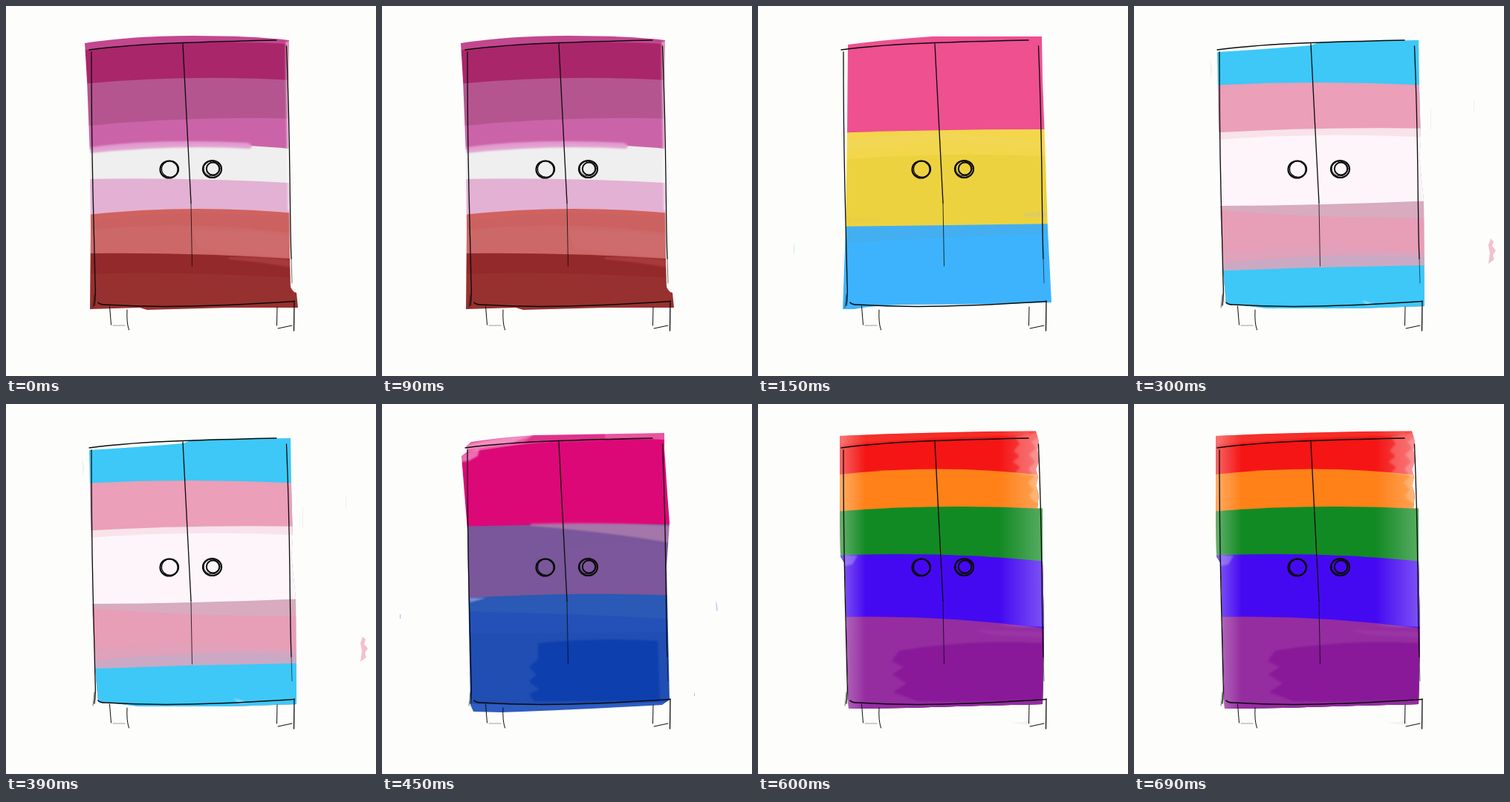
Write an HTML page that moves like this. It is 498 px wide and 498 px high and loops after 0.75 s.

```html
<!DOCTYPE html>
<html lang="en">
<head>
<meta charset="utf-8">
<title>Wardrobe</title>
<style>
  html, body { margin: 0; width: 100%; height: 100%; overflow: hidden; background: #fdfefc; }
  svg { display: block; width: 498px; height: 498px; }
  .look { visibility: hidden; filter: blur(.5px); animation: show 750ms step-end infinite; }
  .soft { filter: blur(1.2px); }
  @keyframes show { 0% { visibility: visible; } 20%, 100% { visibility: hidden; } }
  .ink { fill: none; stroke: #0b0b0b; stroke-linecap: round; stroke-linejoin: round; }
</style>
</head>
<body>
<svg id="stage" viewBox="0 0 498 498">
  <defs>
    <linearGradient id="fadeLeft" gradientUnits="userSpaceOnUse" x1="110" x2="145">
      <stop stop-color="#fff" stop-opacity=".35"/>
      <stop offset="1" stop-color="#fff" stop-opacity="0"/>
    </linearGradient>
    <linearGradient id="fadeRight" gradientUnits="userSpaceOnUse" x1="384" x2="325">
      <stop stop-color="#fff" stop-opacity=".3"/>
      <stop offset="1" stop-color="#fff" stop-opacity="0"/>
    </linearGradient>
  </defs>
  <g id="looks"></g>
  <g class="ink" stroke-width="1.3">
    <path d="M112 59Q165 52 238 49.500T364 46"/>
    <path d="M115 62Q115 160 117 250T120 372Q121 390 119 403"/>
    <path d="M119 388L117 406" stroke-width=".6"/>
    <path d="M377.500 54Q381 140 382 230T384 340"/>
    <path d="M384 340L385 373" stroke-width=".6"/>
    <path d="M238 51Q243.500 160 249 265"/>
    <path d="M249 265L250.500 350" stroke-width=".8"/>
    <path d="M124 399Q126 402 134 402Q190 405.500 250 404T388 397.500" stroke-width="1.500"/>
    <path d="M388 397L387.500 437"/>
    <path d="M139.500 404L141.500 429M163 409Q162 426 165.500 436M365 405L364.500 430M366 434L385 430" stroke-width="1"/>
    <path d="M144 430L160 430" stroke-width=".4"/>
    <g stroke-width="2.200">
      <ellipse cx="219.500" cy="220" rx="12" ry="11.500"/>
      <ellipse cx="221" cy="219.500" rx="11.500" ry="11" stroke-width="1.300"/>
      <ellipse cx="277.500" cy="219.500" rx="12.500" ry="11.500"/>
      <ellipse cx="278.500" cy="219" rx="8.700" ry="8.500" stroke-width="2"/>
      <ellipse cx="277" cy="219" rx="11" ry="10" stroke-width="1"/>
    </g>
  </g>
</svg>
<script>
const NS = 'http://www.w3.org/2000/svg';
const looks = document.getElementById('looks');

function add(parent, tag, attrs) {
  const el = document.createElementNS(NS, tag);
  for (const k in attrs) el.setAttribute(k, attrs[k]);
  return parent.appendChild(el);
}

// Everything below a gently curved edge, given at x = 100, 250 and 400.
function below(left, mid, right) {
  return `M100 ${left}Q250 ${2 * mid - (left + right) / 2} 400 ${right}V420H100Z`;
}

// bands: [colour, left, mid, right]; strokes and specks: [colour, path, opacity]
const themes = [
  {
    body: 'M106 50Q170 40 250 40T381 46L380 110L381 250L382 340L383 378Q386 385 391 386L393 406L300 406L190 409L180 406L113 408L114 300L113 200L109 100Z',
    bands: [
      ['#c2478f', 0, 0, 0], ['#a9266b', 60, 49, 52], ['#b4558f', 105, 97, 101],
      ['#cb63a8', 162, 152, 152], ['#eeefee', 195, 186, 194], ['#e3b1d3', 233, 233, 239],
      ['#d0625f', 282, 273, 280], ['#cb6261', 290, 279, 286], ['#cd6868', 303, 296, 308],
      ['#93292a', 333, 334, 341], ['#97312f', 361, 360, 367]
    ],
    strokes: [
      ['#e39ed0', 'M113 190Q200 178 325 184Q335 188 328 192Q230 186 113 198Z', .95],
      ['#d06f70', 'M250 302Q320 300 381 308V338Q310 336 258 326Z', .5],
      ['#b8464a', 'M300 338Q350 336 383 342V352Q350 345 300 341Z', .6],
      ['#fff', 'M376 50L382 46V275H379Z', .5]
    ],
    specks: []
  },
  {
    body: 'M121 52Q175 45 235 41L382 41L383 100L386 180L390 300L395 399Q300 402 200 402Q155 403 130 408L114 408L118 300L120 170Z',
    bands: [
      ['#ee5090', 0, 0, 0], ['#f4d64c', 171, 167, 166], ['#edd240', 208, 200, 203],
      ['#43aff1', 297, 295, 293], ['#3eb3fd', 320, 312, 306]
    ],
    strokes: [
      ['#d3cb72', 'M357 279L388 277V283L359 284Z', .7],
      ['#f0da65', 'M120 178L250 170L386 184V190L250 182L120 194Z', .4],
      ['#e2cb4a', 'M120 285L168 287L150 291L119 291Z', .5]
    ],
    specks: [['#b9e4fa', 'M49 318Q47 328 49 337Z', .9]]
  },
  {
    body: 'M112 62Q180 58 238 53L252 48L383 46L384 110L386 180L384 205L390 262L391 404L300 407H180L124 400L120 355L116 268L114 170Z',
    bands: [
      ['#3dc8f7', 0, 0, 0], ['#eb9fb9', 107, 103, 107], ['#f8e3ea', 171, 165, 165],
      ['#fdf5f9', 181, 174, 177], ['#d8abbf', 269, 267, 262], ['#e79eb7', 274, 283, 285],
      ['#cba9c4', 347, 336, 335], ['#3dc8f7', 357, 352, 349]
    ],
    strokes: [
      ['#d9a5bf', 'M117 330L255 324L390 330V338L250 334L118 344Z', .5],
      ['#bdeafa', 'M306 396L326 402L314 403Z', .7]
    ],
    specks: [
      ['#f2b9cc', 'M480 313L484 317L482 323L487 329L483 335L485 341L477 347L479 333L477 322Z', .9],
      ['#eeeeee', 'M102 70L106 85L103 100Z', .7],
      ['#e6e6e6', 'M399 138H400V166H399ZM457 125H458V142H457Z', .6]
    ]
  },
  {
    body: 'M107 70L115 64L113 57L120 51Q160 45 205 42L380 39L380 60L384 120L387 160L383 219L384 260L387 398L377 405Q250 412 160 415L123 414L119 405L117 300L115 170Z',
    bands: [
      ['#e9559f', 0, 0, 0], ['#dc0877', 68, 49, 49], ['#79579a', 165, 162, 162],
      ['#2a59b6', 262, 256, 258], ['#2351b7', 279, 283, 290], ['#204eb3', 308, 308, 307],
      ['#2e5cc0', 403, 405, 400]
    ],
    strokes: [
      ['#f29ac9', 'M106 68L131 60L129 70L116 77L107 78Z', .7],
      ['#f5a9cf', 'M112 56Q150 45 204 42L170 54L114 62Z', .7],
      ['#df2a86', 'M204 41L300 39V49L190 53Z', .8],
      ['#c28ab4', 'M200 161Q300 158 388 164V187Q310 173 200 164Z', .6],
      ['#8a5a9e', 'M250 192Q320 180 386 190V256Q300 253 250 254Z', .25],
      ['#0d3fae', 'M210 322Q290 314 371 319L374 400H205L198 390L212 384L198 374L208 364L198 354L210 344Z', .95],
      ['#8f9cd6', 'M117 261L140 261L119 267Z', .8]
    ],
    specks: [
      ['#a9b2e2', 'M24 283H25V289H24ZM420 389H421V393H420Z', .9],
      ['#c5c9ee', 'M449 264L451 270L452 278L450 279Z', .9]
    ]
  },
  {
    body: 'M110 43Q240 37 374 36.500L378 50L376 62L379 75L374 88L377 98L374 110L378 122L376 140H383L383 210L385 300L383 404L300 406L200 409L122 410L120 340L117 215L111 205L110 120Z',
    bands: [
      ['#f51515', 0, 0, 0], ['#ff8118', 96, 87.5, 98], ['#128a23', 145, 138, 142],
      ['#4509f1', 204, 203, 213], ['#952da0', 287, 289, 304]
    ],
    strokes: [
      ['#fff', 'M380 38L346 44L352 54L344 63L352 70L343 78L353 85L346 93L380 98Z', .2],
      ['#fff', 'M380 44L368 50L374 60L365 68L373 78L364 87L372 98L363 106L371 115L365 124L372 131L380 138Z', .22],
      ['#f5554a', 'M110 42L200 39L364 36V42L238 46L110 55Z', .4],
      ['#8c72ec', 'M116 203L134 204L127 216L117 218Z', .6],
      ['#881798', 'M190 332Q290 316 384 322V398Q300 402 215 400L182 388L200 376L181 364L196 354L180 346Z', .85],
      ['#a443ad', 'M290 304L384 306V315L310 310Z', .4],
      ['url(#fadeLeft)', 'M105 35H145V415H105Z', 1],
      ['url(#fadeRight)', 'M325 35H390V300H325Z', 1]
    ],
    specks: [['#f1f1f1', 'M340 429L362 427V432Z', .8]]
  }
];

const defs = add(looks, 'defs', {});
themes.forEach((t, i) => {
  const clip = add(defs, 'clipPath', { id: 'body' + i });
  add(clip, 'path', { d: t.body });
  const look = add(looks, 'g', { class: 'look' });
  look.style.animationDelay = `${i * 150 - 750}ms`;
  const paint = add(look, 'g', { 'clip-path': `url(#body${i})` });
  for (const [fill, ...edge] of t.bands) add(paint, 'path', { fill, d: below(...edge) });
  const soft = add(paint, 'g', { class: 'soft' });
  for (const [fill, d, opacity] of t.strokes) add(soft, 'path', { fill, d, opacity });
  for (const [fill, d, opacity] of t.specks) add(look, 'path', { fill, d, opacity });
});
</script>
</body>
</html>
```
